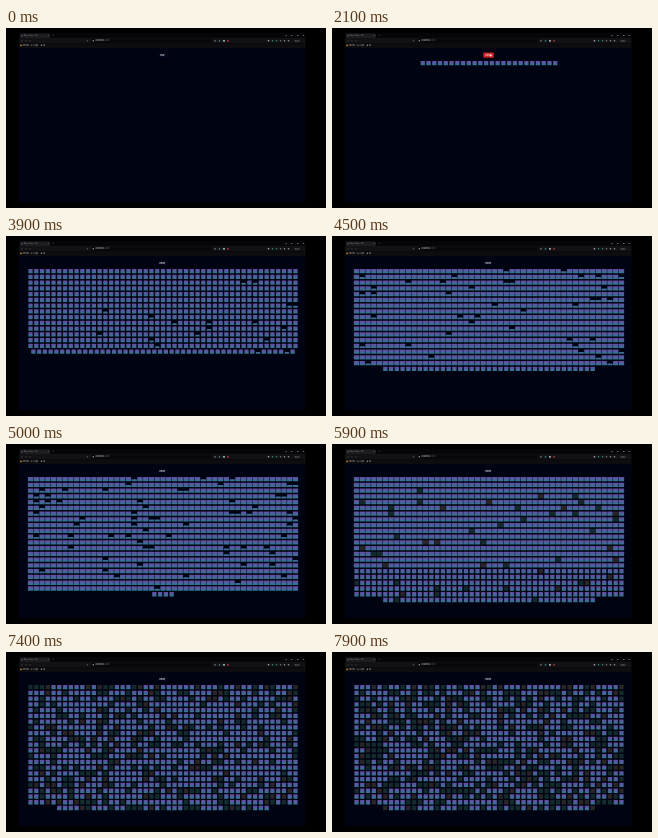
Write an HTML page with a canvas that moves like this. It is 320 px wide and 180 px high and loops after 8000 ms.

```html
<!DOCTYPE html>
<html lang="en">
<head>
<meta charset="utf-8">
<style>
html, body { margin: 0; width: 100%; height: 100%; overflow: hidden; background: #000; }
canvas { display: block; width: 320px; height: 180px; }
</style>
</head>
<body>
<canvas id="stage" width="320" height="180"></canvas>
<script>
const ctx = document.getElementById('stage').getContext('2d');
const LOOP = 8000, COLS = 47, PITCH = 5.76, CENTER = 157, TOP = 32.9, SIZE = 4.3;

// [time, value] keys
const COUNT = [[2000, 0], [2100, 24], [2900, 360], [3900, 704], [4700, 880], [5000, 944], [5400, 1024]];
const DARK = [[2500, 0], [3900, .03], [5000, .08], [5900, .06], [6800, .15], [7900, .4]];

function at(keys, t) {
  if (t <= keys[0][0]) return keys[0][1];
  for (let i = 1; i < keys.length; i++) {
    const [t0, v0] = keys[i - 1], [t1, v1] = keys[i];
    if (t <= t1) return v0 + (v1 - v0) * (t - t0) / (t1 - t0);
  }
  return keys[keys.length - 1][1];
}

function noise(i, k) {
  const n = Math.sin(i * 12.9898 + k * 78.233) * 43758.5453;
  return n - Math.floor(n);
}

function box(color, x, y, w, h, r = 0) {
  ctx.fillStyle = color;
  ctx.beginPath();
  ctx.roundRect(x, y, w, h, r);
  ctx.fill();
}

function dot(color, x, y, r = .9) {
  ctx.fillStyle = color;
  ctx.beginPath();
  ctx.arc(x, y, r, 0, 7);
  ctx.fill();
}

function text(str, x, y, size, color, align = 'left', weight = 400) {
  ctx.font = `${weight} ${size}px Inter, sans-serif`;
  ctx.textAlign = align;
  ctx.textBaseline = 'middle';
  ctx.fillStyle = color;
  ctx.fillText(str, x, y);
}

function drawBrowser() {
  box('#000', 0, 0, 320, 180);
  box('#000312', 13, 20, 286.5, 154);
  box('#060608', 13, 5, 286.5, 5);
  box('#1d1d21', 14, 5.5, 30, 4.5, 1);
  box('#121216', 13, 10, 286.5, 5.3);
  box('#0d0d11', 13, 15.3, 286.5, 4.7);
  dot('#777b8c', 16, 7.6, .7);
  text('Vite + Vue + TS', 18, 7.7, 1.8, '#a4a4aa');
  text('×', 41.5, 7.6, 2.5, '#999');
  text('+', 46.5, 7.6, 2.5, '#888');
  for (const x of [279.5, 285, 291, 296.5]) box('#888', x, 7.2, 1.4, .7);

  for (const x of [16, 20, 24]) dot('#55555c', x, 12.8, .6);
  dot('#55555c', 81.5, 12.8, .7);
  box('#070709', 85, 10.8, 121, 3.9, 1.5);
  dot('#aaa', 87.3, 12.8, .7);
  text('localhost', 89.5, 12.9, 2, '#ddd');
  text(':3000', 98, 12.9, 2, '#777');
  [[209, '#66666c'], [213.5, '#35777a'], [218, '#ddd'], [222, '#b23a3a']]
    .forEach(([x, c]) => dot(c, x, 12.8));
  ['#bbb', '#2c8f8b', '#348a58', '#777', '#8d8d94', '#a08a8a']
    .forEach((c, i) => dot(c, 262.5 + i * 4, 12.8, .8));
  text('100%', 288.5, 12.9, 2.1, '#aaa');

  dot('#d08a2e', 15, 17.3);
  text('Movies', 16.8, 17.4, 1.9, '#b5b0a5');
  dot('#777', 25.7, 17.3, .7);
  text('Login', 27.3, 17.4, 1.9, '#aaa');
  dot('#999', 35.4, 17.3, .7);
  text('up', 37, 17.4, 1.9, '#aaa');
}

function drawButton(t) {
  const hover = t >= 1300 && t < 2900;
  box(hover ? '#cf2026' : '#03061a', 151.2, 24.6, 10.6, 5.2, 1);
  text(t < 2100 ? 'Play' : 'Reset', 156.4, 27.3, 2.1, '#f4f4f4', 'center', 600);
  if (hover) {
    ctx.fillStyle = '#fff';
    ctx.beginPath();
    ctx.moveTo(158.4, 26);
    ctx.lineTo(160.2, 28);
    ctx.lineTo(158.4, 28.4);
    ctx.fill();
  }
}

function rowGradient(y) {
  const fill = ctx.createLinearGradient(0, y, 0, y + SIZE);
  fill.addColorStop(0, '#6a49a6');
  fill.addColorStop(1, '#2f7890');
  return fill;
}

function drawTile(i, x, y, wide, fill, t) {
  const step = Math.floor(t / 700 + noise(i, 3));
  const dark = noise(i, step + 10) < at(DARK, t);
  const w = wide ? 5.3 : SIZE;
  x -= (w - SIZE) / 2;
  if (!dark) {
    box(fill, x, y, w, SIZE, .5);
  } else if (t < 5400) {
    box(fill, x, y + 2.4, w, SIZE - 2.4, .4);
  } else {
    box(noise(i, 5) < .7 ? '#142b2d' : '#2a2526', x, y, w, SIZE, .5);
  }
}

function drawGrid(t) {
  const count = Math.round(at(COUNT, t));
  for (let row = 0; row * COLS < count; row++) {
    const inRow = Math.min(COLS, count - row * COLS);
    const wide = inRow === COLS && t >= 4400 && t < 6520 - 40 * row;
    const left = CENTER - inRow * PITCH / 2 + (PITCH - SIZE) / 2;
    const y = TOP + row * PITCH;
    const fill = rowGradient(y);
    for (let col = 0; col < inRow; col++) {
      drawTile(row * COLS + col, left + col * PITCH, y, wide, fill, t);
    }
  }
}

function frame(now) {
  const t = Math.floor(now % LOOP / 100) * 100;
  drawBrowser();
  drawButton(t);
  drawGrid(t);
  requestAnimationFrame(frame);
}
requestAnimationFrame(frame);
</script>
</body>
</html>
```
